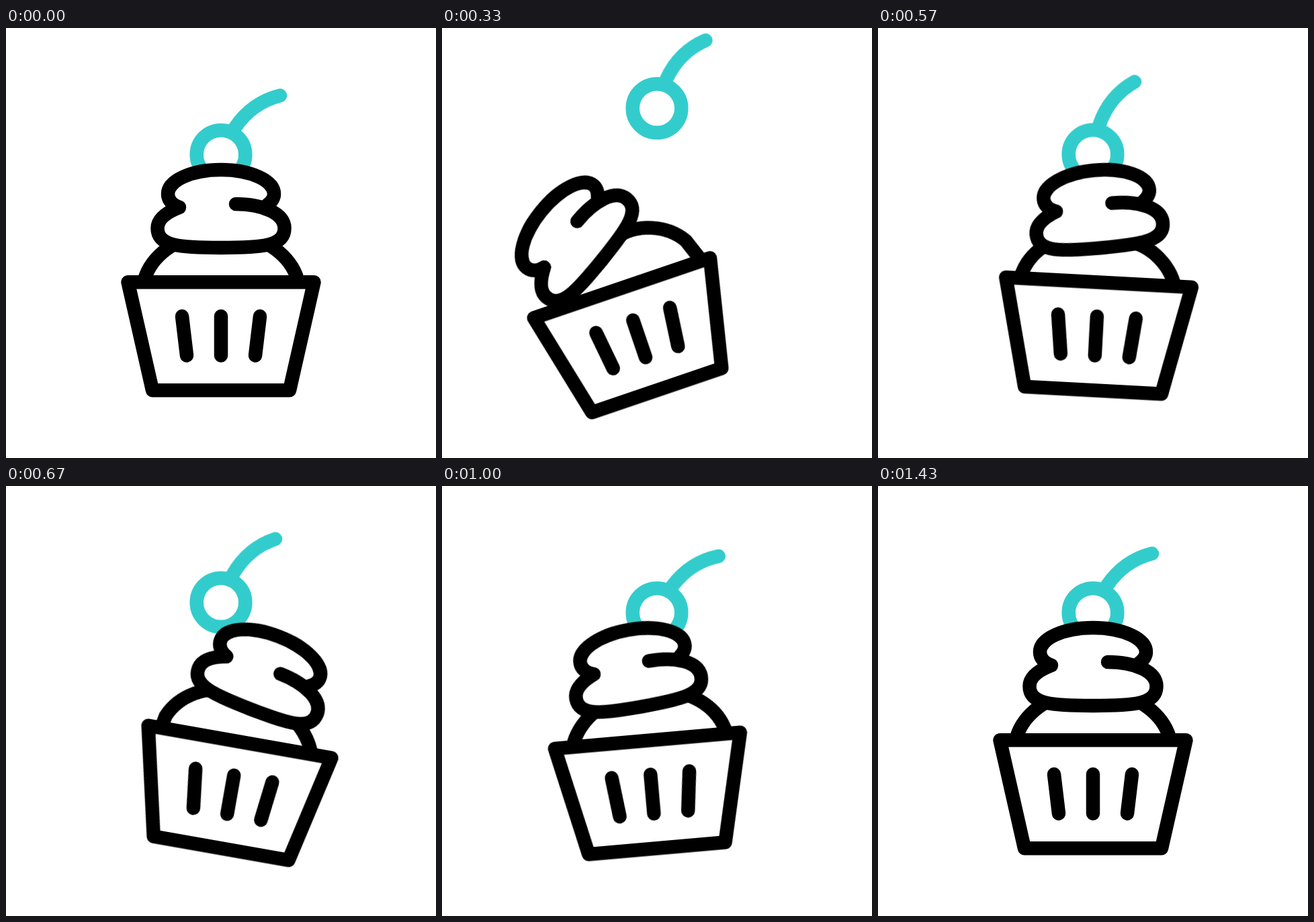
Recreate the animation shown at these times as an HTML page. Size 640 by 640 pixels, loop 2 s.

```html
<!DOCTYPE html>
<html lang="en">
<head>
<meta charset="utf-8">
<title>Wobbling cupcake</title>
<style>
  html, body { margin: 0; width: 100%; height: 100%; overflow: hidden; background: #fff; }
  svg { display: block; width: 100vw; height: 100vh; }
  path, circle { stroke-width: 20.5; stroke-linecap: round; stroke-linejoin: round; fill: none; stroke: #000; }
  #cherry path, #cherry circle { stroke: #3cc; }
  .solid { fill: #fff; }
  #cup { transform-origin: 320px 540px; }
  #dome { transform-origin: 320px 370px; }
  #cream { transform-origin: 319px 333px; }
  #stem { transform-origin: 320px 188.5px; }
</style>
</head>
<body>
<svg viewBox="0 0 640 640">
  <g id="cherry">
    <path id="stem" d="M341 148C356 126 378 108 408 100.5"/>
    <circle cx="320" cy="188.5" r="36.3"/>
  </g>
  <g id="cup">
    <g class="dome">
      <path class="solid" d="M204 430L204.5 380C212 346 246 313 288 313H352C394 313 428 346 435.5 380L436 430"/>
    </g>
    <path class="solid" d="M181.5 378.2H458.5L422 539.3H218Z"/>
    <path d="M262 429L269 487.5M320 429V487.5M378 429L371 487.5"/>
    <g class="dome">
      <g id="cream">
        <path class="solid" d="M258 267C247 263 241 256 241 247C241 227 276 211 320 211C364 211 399 227 399 247C399 254 395 259 388 264"/>
        <path class="solid" d="M258 267C240 274 225.5 284 225.5 298C225.5 325 260 327 320 327C380 327 414.5 325 414.5 298C414.5 276 382 262 342 262"/>
      </g>
    </g>
  </g>
</svg>
<script>
const LOOP = 2000, TICKS = 60, TICK = LOOP / TICKS;
const rotate = v => `rotate(${v}deg)`;
const lift = v => `translateY(${-v}px)`;

// Rows are [tick, value]; the pose rests before the first and after the last row.
const swing = [[0, 0], [10, -18.8], [20, 10], [30, -5], [38, 0]];
const lateSwing = swing.map(([tick, v]) => [tick + 5, v]);
const creamSwing = [[4.7, 0], [13.5, -21], [23.5, 10.8], [33.5, -5], [43, 0]];
const bounce = [[0, 0], [10, 69], [17.3, 0], [23.3, 35], [29, 0]];

const anims = [];
function move(selector, form, rows) {
  const keys = [[0, 0], ...rows, [TICKS, 0]].map(([tick, v]) => ({
    offset: tick / TICKS,
    transform: form(v),
    easing: "cubic-bezier(.25, 0, .75, 1)"
  }));
  for (const el of document.querySelectorAll(selector)) {
    const anim = el.animate(keys, { duration: LOOP, iterations: Infinity });
    anim.pause();
    anims.push(anim);
  }
}

// The dome and the cream on it share one extra tilt on top of the cup's.
for (const g of document.querySelectorAll(".dome")) g.style.transformOrigin = "320px 370px";

move("#cup", rotate, swing);
move(".dome", rotate, swing);
move("#cream", rotate, creamSwing);
move("#cherry", lift, bounce);
move("#stem", rotate, lateSwing);

// Poses advance thirty times a second.
function draw(now) {
  const tick = Math.floor((now % LOOP + 4) / TICK) % TICKS;
  for (const anim of anims) anim.currentTime = tick * TICK;
  requestAnimationFrame(draw);
}
draw(performance.now());
</script>
</body>
</html>
```
